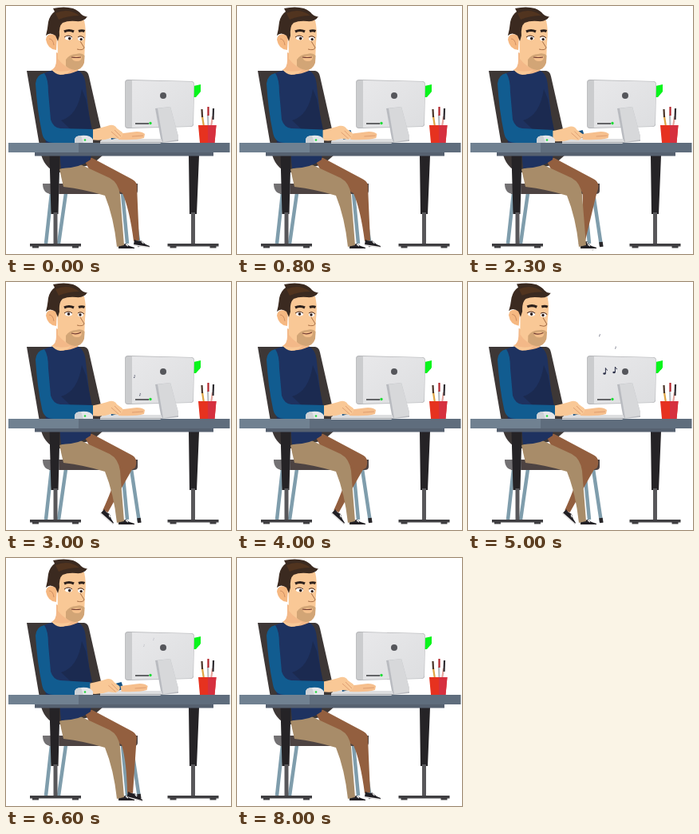
Animation of 282 by 310 pixels, one loop 8100 ms. Source, as an HTML page:

```html
<!DOCTYPE html>
<html lang="en">
<head>
<meta charset="utf-8">
<title>Working at the desk</title>
<style>
  html, body { margin: 0; width: 100%; height: 100%; overflow: hidden; background: #fff; }
  svg { display: block; width: 100vw; height: 100vh; }
</style>
</head>
<body>
<svg viewBox="0 0 282 310">
  <defs>
    <linearGradient id="metal" x2="1" y2="1">
      <stop stop-color="#e8e8ea"/><stop offset="1" stop-color="#dddee0"/>
    </linearGradient>
    <g id="shoe">
      <path d="M0 0 Q4 2 9 0 Q14 4 20 5 L20 7 L0 7Z" fill="#211f24"/>
      <path d="M0 6 H20 V7.600 H0Z" fill="#e9e7e6"/>
      <path d="M9 1 L12 3" stroke="#fff" stroke-width="1.200"/>
    </g>
    <g id="note">
      <ellipse cx="-1" cy="3" rx="1.700" ry="1.300"/>
      <path d="M.4 3 V-4 Q1 -2 3 -1" fill="none" stroke="#2c3048"/>
    </g>
    <g id="stand">
      <path d="M-2.500 258 H2.500 V298 H-2.500Z" fill="#58575a"/>
      <path d="M-32 297 H32 V300.500 H-32Z M-29 300 H-21 V302.500 H-29Z M21 300 H29 V302.500 H21Z" fill="#3f3e41"/>
    </g>
  </defs>

  <!-- chair -->
  <path d="M26 81 H98 Q103 82 104 88 L119 154 L122 186 L108 198 L68 208 Q50 206 44 186Z" fill="#3d3736"/>
  <path d="M57 234 L50 297 M75 234 L66 297 M146 234 L152 297 M157 234 L167 300" fill="none" stroke="#7f9dac" stroke-width="4.500"/>
  <path d="M166.500 295 L167.300 301" stroke="#292629" stroke-width="4.500"/>
  <path d="M54 222 H165 V231 Q165 235 160 235 H54Z" fill="#4d4342"/>
  <path d="M46 222 H67 V235 H56 Q46 234 46 222Z" fill="#737173"/>

  <!-- legs -->
  <g id="shin">
    <path d="M146 222 Q160 213 164 223 Q165 250 167 293 L160 294 Q155 255 146 234Z" fill="#935f3f"/>
    <use href="#shoe" transform="translate(161 292) rotate(9)"/>
  </g>
  <path d="M96 189 L108 190 L157 216 Q166 220 162 232 Q157 237 146 234 L110 215Z" fill="#935f3f"/>
  <use href="#shoe" x="141" y="297"/>
  <path d="M67 204 L91 197 L130 215 Q141 221 143 236 L148 299 L139 301 Q135 264 124 237 Q98 229 72 226Z" fill="#a88c69"/>

  <!-- body -->
  <path d="M41 88 Q52 81 60 80 H89 Q99 84 100 100 L108 172 L106 192 Q92 203 69 203 L66 172 H50Z" fill="#1e3260"/>
  <path d="M95 104 L100 116 L108 155 H82 L69 143 Q90 137 95 104Z" fill="#1b2a50"/>

  <!-- head -->
  <g id="head">
    <path d="M63 58 L91 70 L90 81 Q70 90 57 80 Q63 77 63 68Z" fill="#f3b888"/>
    <path d="M57 79 Q68 84 82 80 Q76 86 68 86 Q61 85 57 79Z" fill="#f9c896"/>
    <path d="M64 37 Q51 32 50 42 Q52 54 63 55Z" fill="#f6b881"/>
    <path d="M54 41 Q59 41 60 49" fill="none" stroke="#d08f63"/>
    <path d="M64 18 H98 Q101 30 99 46 L98 70 Q95 80 86 80 Q73 77 65 66Z" fill="#f9c896"/>
    <path d="M75 67 Q80 60 88 60 Q95 58 98.500 62 L98 71 Q95 80 86 80 Q79 79 75 75Z" fill="#d2a576"/>
    <path d="M82 64 Q89 61 95 63 Q95 69 89 69 Q83 69 82 64Z" fill="#f5c08c"/>
    <path d="M50 37 Q52 30 53 20 Q55 11 61 7 L59 3 Q73 0 84 3 Q91 6 94 10 Q98 14 102 13 Q98 20 88 19 Q78 18 71 21 Q66 25 67 37 L65 44 L62 37 Q55 32 50 37Z" fill="#3b2a20"/>
    <path d="M62 9 Q78 2 92 12 Q78 12 66 17Z" fill="#51341f"/>
    <g fill="#fff"><ellipse cx="78.500" cy="40" rx="4.500" ry="2.500"/><ellipse cx="93.500" cy="41" rx="3.500" ry="2.400"/></g>
    <g id="pupils" fill="#2b1b19"><circle cx="78.500" cy="40" r="1.800"/><circle cx="93" cy="41" r="1.700"/></g>
    <path d="M73 39 Q78 35 83 39 M90 39 Q94 36 98 40" fill="none" stroke="#492a20"/>
    <path id="brows" d="M73 32 Q79 29 85 32 M91 31.500 Q95 30 98.500 31.500" fill="none" stroke="#2d211c" stroke-width="3.200"/>
    <path d="M93 44 L98 52 Q97 56 89 54" fill="none" stroke="#a87048"/>
    <path id="mouth" fill="none" stroke="#713b31" stroke-width="1.200"/>
  </g>

  <!-- desk -->
  <path d="M54.500 187 H67.500 L65.500 260 H56.500Z M229 187 H242 L239 260 H230Z" fill="#252326"/>
  <use href="#stand" x="62"/>
  <use href="#stand" x="234.500"/>
  <path d="M36 182 H260 V187.500 H36Z" fill="#566170"/>
  <path d="M3 171 H280.500 V183 H3Z" fill="#5f6d7d"/>
  <path d="M3 171 H91 V183 H3Z" fill="#708191"/>

  <!-- pen cup -->
  <g stroke-width="2.200">
    <path d="M246 138 L248 151" stroke="#dfa544"/><path d="M245.500 129 L246 139" stroke="#4a3428"/>
    <path d="M253 136 L253.500 151" stroke="#b9bdc2"/><path d="M253.500 126 V137" stroke="#b3242b"/>
    <path d="M259 138 L257 151" stroke="#e5a8a0"/><path d="M260 128 L259.500 142" stroke="#2e2b30"/>
  </g>
  <path d="M241 149 H263.500 L261.500 171 H243Z" fill="#e6321f"/>
  <path d="M253 149 H263.500 L261.500 171 H253Z" fill="#d6303f"/>

  <!-- monitor -->
  <path d="M235 100 L244 98 V107 L238 114 H235Z" fill="#08f51b"/>
  <path d="M149 96 Q149 92 153 92 L232 94 Q236 94 236 98 L235 148 Q235 151 231 151 L153 153 Q149 153 149 149Z" fill="#b2b3b6"/>
  <path d="M158 93 L232 94.500 Q235.500 95 235.500 98 L234.500 147 Q234 150 231 150.500 L158 152Z" fill="url(#metal)"/>
  <path d="M149.500 96 Q150 93 153 93 H158 V152 H153 Q149.500 152 149.500 149Z" fill="#cbccce"/>
  <path d="M162 147 H179" stroke="#55565a" stroke-width="1.800"/>
  <circle cx="181" cy="146.500" r="1.700" fill="#20dc38"/>
  <path d="M187 128 L206 126 L216 163 V169 L196 171 L194 166Z" fill="#b9bbc0"/>
  <path d="M190 128 L206 126 L216 163 V167 L197 170Z" fill="#d7d8da"/>
  <circle cx="197" cy="112" r="4" fill="#55565b"/>
  <path d="M118 169 L122 166 H194 L196 170 L193 172 H118Z" fill="#dddee0"/>
  <path d="M118 170.500 H196" stroke="#a6a9ae"/>

  <!-- arms -->
  <g id="farHand">
    <path d="M130 158 L141 155 L144 164 L132 167Z" fill="#145183"/>
    <path d="M140 160 Q155 158 164 157 Q171 157 174 160 L173 165 Q163 168 141 167Z" fill="#f6bf8d"/>
    <path d="M158 163 L172 162" stroke="#d8956a" stroke-width=".800"/>
  </g>
  <g id="nearHand">
    <path d="M106 155 Q121 152 130 149 Q136 148 139 153 L146 158 Q148 163 141 166 L132 165 Q121 169 106 167Z" fill="#f9c896"/>
    <path d="M132 157 L141 165 M136 155 L144 163" stroke="#d8956a" stroke-width=".800"/>
  </g>
  <path id="sleeve" fill="#115c90"/>
  <path d="M86 168 Q86 162 94 162 Q106 161 109 167 V171 H86Z" fill="#e4e6e9"/>
  <path d="M86 168 Q86 162 94 162 L97 171 H86Z" fill="#cdd1d6"/>
  <circle cx="99" cy="167.500" r="1.300" fill="#25d840"/>

  <g id="notes" fill="#2c3048"></g>
</svg>
<script>
const LOOP = 8100, STEP = 100, LIFE = 1000;
const el = id => document.getElementById(id);
const set = (id, name, value) => el(id).setAttribute(name, value);
const ease = (t, a, b) => {
  const p = Math.min(1, Math.max(0, (t - a) / (b - a)));
  return p * p * (3 - 2 * p);
};
const hold = (t, a, b, c, d) => ease(t, a, b) - ease(t, c, d);

// x, starting y, starting time
const notes = [
  [161, 125, 2860], [168, 147, 2870],
  [165, 114, 4050], [185, 129, 4060],
  [172, 129, 4650], [184, 127, 4660],
  [173, 111, 6565], [185, 103, 6565]
];

function drawNotes(t) {
  el('notes').innerHTML = notes.map(([x, y, start]) => {
    const p = (t - start) / LIFE;
    if (p <= 0 || p >= 1) return '';
    const size = Math.max(.35, Math.min(1, p * 3, (1 - p) * 4));
    return `<use href="#note" opacity="${Math.min(1, p * 8)}" transform="translate(${x} ${y - 50 * p}) scale(${size})"/>`;
  }).join('');
}

function draw(now) {
  const t = Math.floor(now % LOOP / STEP) * STEP;
  const type = (1 - Math.cos(t * Math.PI / 500)) / 2;
  const tuck = hold(t, 1600, 3000, 5600, 7000);
  const gaze = hold(t, 2300, 2800, 5500, 6000);
  const tilt = hold(t, 4400, 4900, 5200, 5800);
  const cuff = 109 - 4 * type, drop = 1.5 * type;

  set('shin', 'transform', `rotate(${32 * tuck} 156 222)`);
  set('head', 'transform', `rotate(${1.5 * tilt} 76 80)`);
  set('pupils', 'transform', `translate(${1.2 - 1.2 * gaze} ${.6 - .6 * gaze})`);
  set('brows', 'transform', `translate(0 ${-tilt})`);
  set('mouth', 'd', `M82 64 Q88 ${65 + gaze} 94 ${64 - gaze}`);
  set('nearHand', 'transform', `translate(${-4 * type} ${2.5 * type})`);
  set('farHand', 'transform', `translate(${4 * type} 0)`);
  set('sleeve', 'd', `M37 97 Q38 86 48 84 Q53 91 53 108 L56 142 Q59 152 68 153 L${cuff} ${154 + drop} V168 L96 171 H60 Q47 171 45 158 Q39 130 37 97Z`);
  drawNotes(t);
}

const begin = performance.now();
(function tick() {
  draw(performance.now() - begin);
  requestAnimationFrame(tick);
})();
</script>
</body>
</html>
```
